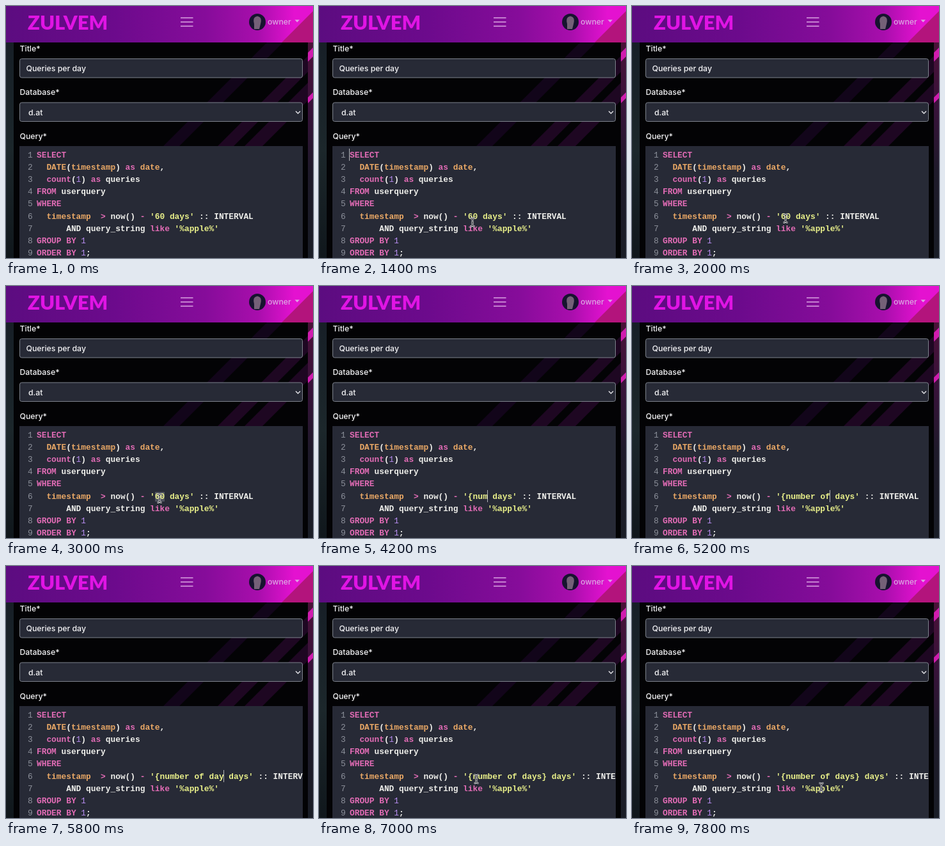
These frames come from a looping animation (480 px wide and 394 px high, 8 s). An HTML page:

```html
<!DOCTYPE html>
<html lang="en">
<head>
<meta charset="utf-8">
<title>Query editor</title>
<style>
html, body { margin: 0; width: 100%; height: 100%; overflow: hidden; background: #000; }
#stage { position: relative; width: 480px; height: 394px; overflow: hidden; }
#stage > * { position: absolute; }
svg { left: 0; top: 0; }
svg text { font: 500 12.3px Inter, "Open Sans", sans-serif; fill: #f4f4f6; }
svg .brand { font: 900 31px Lato, sans-serif; fill: #e014e4; }
svg .user { fill: #dca6e2; }
.field { fill: #272a36; stroke: #7d828c; }
pre { margin: 0; top: 219px; height: 170.500px; padding-top: 4.500px; overflow: hidden;
  font: bold 12.83px/19.2px "Liberation Mono", monospace; color: #f0f0ec; }
#code { left: 21px; width: 416px; padding-left: 27px; background: #272a36; }
#nums { left: 34px; font-weight: normal; color: #8d919b; }
#caret { width: 1px; height: 19px; background: #b4b5ba; }
.k { color: #e36cb6; }
.o { color: #eba966; }
.s { color: #e9f08a; }
.n { color: #b78df0; font-weight: normal; }
.sel { background: #50535f; }
</style>
</head>
<body>
<div id="stage">
  <svg width="480" height="394">
    <defs>
      <linearGradient id="head">
        <stop offset="0" stop-color="#5c0c80"/>
        <stop offset=".35" stop-color="#6c0a8c"/>
        <stop offset=".65" stop-color="#860c9a"/>
        <stop offset=".82" stop-color="#a80eac"/>
        <stop offset=".94" stop-color="#e412d0"/>
      </linearGradient>
      <linearGradient id="side" x2="0" y2="1">
        <stop offset="0" stop-color="#171f27"/>
        <stop offset=".5" stop-color="#1c272b"/>
        <stop offset="1" stop-color="#10171c"/>
      </linearGradient>
      <linearGradient id="edge" x2="0" y2="1">
        <stop offset="0" stop-color="#4a1238"/>
        <stop offset=".3" stop-color="#38123a"/>
        <stop offset=".6" stop-color="#1e1a2a"/>
        <stop offset="1" stop-color="#191d26"/>
      </linearGradient>
    </defs>
    <rect width="480" height="394" fill="#030305"/>
    <rect y="57" width="12" height="337" fill="url(#side)"/>
    <rect x="472" y="57" width="8" height="337" fill="url(#edge)"/>
    <path d="M472 73L480 65V79L472 87ZM472 143L480 135V144L472 152Z" fill="#d01cae"/>
    <path d="M246 219L408 57H433L271 219Z" fill="#12051a"/>
    <path d="M331 219L472 78V103L356 219ZM373 219L472 120V148L401 219Z" fill="#1e0722"/>

    <rect width="480" height="57" fill="url(#head)"/>
    <path d="M431 57L480 8V57Z" fill="#b3147c"/>
    <text class="brand" x="34" y="37">ZULVEM</text>
    <path d="M273 18.500H292.500M273 25H292.500M273 31.500H292.500" stroke="#dca6e2" stroke-width="1.500"/>
    <circle cx="393" cy="25" r="13" fill="#17132f"/>
    <path d="M388 36V28Q385 17 393 16Q401 17 398 28L396 36Z" fill="#756078"/>
    <text class="user" x="409" y="28.500">owner</text>
    <path d="M451.500 21.500H459L455.200 25.500Z" fill="#dca6e2"/>

    <text x="21.500" y="70.500">Title*</text>
    <text x="21.500" y="139">Database*</text>
    <text x="21.500" y="207.500">Query*</text>
    <rect class="field" x="21.500" y="82.500" width="442" height="29.500" rx="3"/>
    <rect class="field" x="21.500" y="151" width="442" height="29.500" rx="3"/>
    <text x="31.500" y="101.500">Queries per day</text>
    <text x="35" y="170.500">d.at</text>
    <path d="M453 164.500L456.500 168L460 164.500" fill="none" stroke="#e4e4e8" stroke-width="1.400"/>
  </svg>
  <pre id="code"><b class="k">SELECT</b>
  <b class="o">DATE</b>(<b class="o">timestamp</b>) <b class="k">as</b> <b class="o">date</b>,
  <b class="k">count</b>(<b class="n">1</b>) <b class="k">as</b> queries
<b class="k">FROM</b> userquery
<b class="k">WHERE</b>
  <b class="o">timestamp</b>  <b class="k">&gt;</b> now() <b class="k">-</b> <b class="s">'<span id="value">60</span> days'</b> :: INTERVAL
      AND query_string <b class="k">like</b> <b class="s">'%apple%'</b>
<b class="k">GROUP BY</b> <b class="n">1</b>
<b class="k">ORDER BY</b> <b class="n">1</b>;</pre>
  <pre id="nums">1
2
3
4
5
6
7
8
9</pre>
  <div id="caret"></div>
  <svg id="mouse" width="12" height="18" fill="none">
    <defs>
      <path id="beam" d="M2.500 2.500Q6 2.500 6 5Q6 2.500 9.500 2.500M6 5V13M4 10H8M2.500 15.500Q6 15.500 6 13Q6 15.500 9.500 15.500"/>
    </defs>
    <use href="#beam" stroke="#eee" stroke-width="2.600"/>
    <use href="#beam" stroke="#26262c"/>
  </svg>
</div>
<script>
const LOOP = 8000, STEP = 200, CHAR = 7.7, LINE = 19.2;
const TYPED = "{number of days}";
// Characters present after each step, from 3800 ms on
const COUNTS = [1, 3, 4, 5, 7, 8, 9, 10, 12, 13, 14, 15, 16];
// Pointer path: time, x, y
const ARRIVE = [[1000, 246, 368], [1200, 242, 348], [1400, 240, 338], [2000, 240, 332], [3800, 240, 332]];
const LEAVE = [[7000, 246, 333], [7400, 278, 341], [7800, 296, 346], [8000, 296, 346]];
const [value, caret, mouse] = ["value", "caret", "mouse"].map(id => document.getElementById(id));

function along(path, t) {
  const i = path.findIndex(p => p[0] > t);
  if (i < 1) return null;
  const [a, b] = [path[i - 1], path[i]];
  const f = (t - a[0]) / (b[0] - a[0]);
  return [1, 2].map(k => a[k] + (b[k] - a[k]) * f);
}

function placeCaret(on, col, row) {
  caret.style.display = on ? "block" : "none";
  caret.style.left = Math.floor(47.5 + col * CHAR) + "px";
  caret.style.top = Math.round(223 + row * LINE) + "px";
}

function draw(now) {
  const t = Math.floor(now % LOOP / STEP) * STEP;
  const typing = t >= 3800;
  const n = typing ? COUNTS[Math.min((t - 3800) / STEP, COUNTS.length - 1)] : 0;
  value.textContent = typing ? TYPED.slice(0, n) : "60";
  value.className = t >= 3000 && !typing ? "sel" : "";

  if (typing) placeCaret(t < 6400, 24 + n, 5);
  else placeCaret(t >= 1200 && t < 1800, 0, 0);

  const pos = along(ARRIVE, t) || along(LEAVE, t);
  mouse.style.display = pos ? "block" : "none";
  if (pos) mouse.style.transform = `translate(${pos[0] - 6}px, ${pos[1] - 9}px)`;
  requestAnimationFrame(draw);
}
requestAnimationFrame(draw);
</script>
</body>
</html>
```
